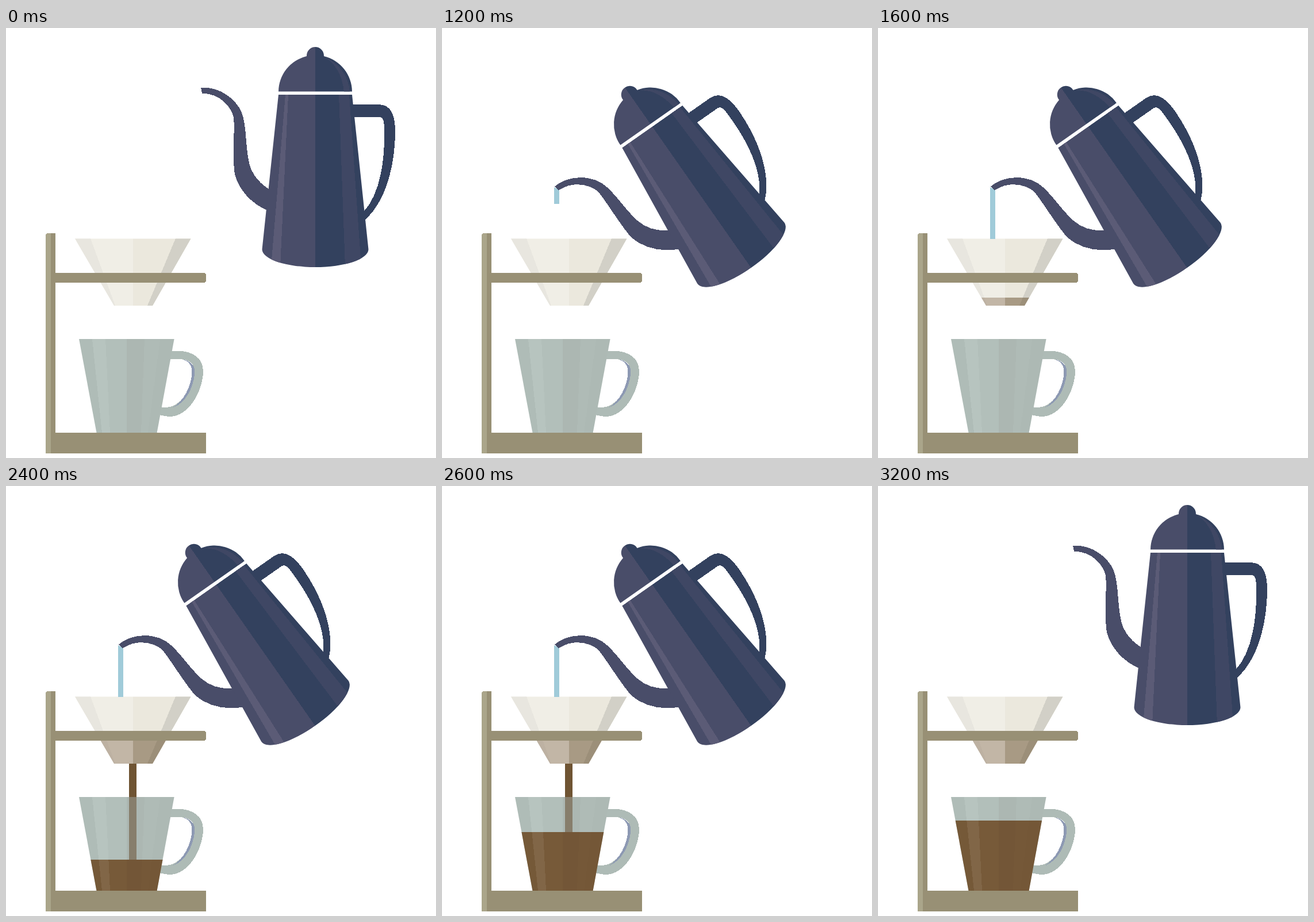
Recreate the animation shown at these times as an HTML page. Size 748x748 px, loop 4.7 s.

```html
<!DOCTYPE html>
<html lang="en">
<head>
<meta charset="utf-8">
<title>Pour-over coffee</title>
<style>
  html, body { margin: 0; height: 100%; overflow: hidden; background: #fff; }
  svg { display: block; width: 100%; height: 100%; }
</style>
</head>
<body>
<svg viewBox="0 0 748 748" shape-rendering="crispEdges">
  <defs>
    <clipPath id="cupShape"><path d="M127 541H292.600L262.600 704H157.500Z"/></clipPath>
    <clipPath id="coneShape"><path d="M120 366.500H321.500L255 483H188Z"/></clipPath>
    <clipPath id="bodyShape"><path d="M474 116H602L630.500 385A92.500 31 0 0 1 445.500 385Z"/></clipPath>
    <clipPath id="lidShape"><path d="M474 110.500A64 64 0 0 1 523 49V48A15 15 0 0 1 553 48V49A64 64 0 0 1 602 110.500Z"/></clipPath>
  </defs>

  <g id="cone" clip-path="url(#coneShape)">
    <path fill="#f0eee6" d="M120 366H221V484H120Z"/>
    <path fill="#ebe8dd" d="M221 366H322V484H221Z"/>
    <path fill="#e8e6df" d="M120 366H147L190 483H180Z"/>
    <path fill="#d2d0c7" d="M295 366H322V483H246Z"/>
    <g fill="#6f5535">
      <rect id="brewLeft" x="120" width="101" opacity=".36"/>
      <rect id="brewRight" x="221" width="101" opacity=".53"/>
    </g>
  </g>

  <path fill="#989075" d="M78 357H86V426H343Q348.400 426 348.400 432V437Q348.400 443 343 443H86V703.600H348.400V740.400H78Z"/>
  <path fill="#aaa58a" d="M71 357H78V740.400H69V359Z"/>

  <path fill="#aebbb6" fill-rule="evenodd" d="M286 562C321 559 343 571 343 598C342 632 318 677 283 676L266 673L268 659C300 667 321 632 328.500 600C329 584 319 576 300 576H285Z"/>
  <path fill="#8d99b3" d="M308 576.500Q329 581 328.500 600C325 630 311 653 290 660.500C309 649 322 624 323.500 600Q324 582 308 576.500Z"/>
  <g clip-path="url(#cupShape)">
    <rect fill="#b2bfba" x="127" y="541" width="167" height="163"/>
    <rect id="innerDrip" fill="#6f5433" opacity=".55" x="214" y="541" width="13"/>
    <rect id="coffee" fill="#775a39" x="127" width="167"/>
    <path opacity=".07" fill="#fff" d="M150 541H173L181 704H167Z"/>
    <path opacity=".02" d="M210 541H294V704H210Z"/>
    <path opacity=".02" d="M210 541H241L235 704H210Z"/>
    <path opacity=".01" d="M268 541H294V704H247Z"/>
    <path opacity=".015" d="M127 541H150L167 704H127Z"/>
  </g>
  <rect id="drip" fill="#6f5433" x="214" y="483" width="13"/>
  <path id="water" fill="#a0cbd9"/>

  <g id="pot">
    <path fill="#33415e" d="M600 133H648C670 133 677 152 677 180C677 240 660 303 624 334L620 322C648 294 658 240 658 190C658 168 659 155 649 155H600Z"/>
    <path fill="#494d69" d="M339 104C368 101 399 121 410 147C419 172 416 203 423 235C428 256 441 270 460 282L456 318C425 305 405 280 398 255C394 235 398 170 396 155C392 139 374 114 341 113.500Z"/>
    <g clip-path="url(#bodyShape)">
      <path fill="#494d69" d="M440 116H538V416H440Z"/>
      <path fill="#5b5b76" d="M486 116H491L477 416H461Z"/>
      <path fill="#33415e" d="M538 116H632V416H538Z"/>
      <path fill="#3f4764" d="M579 116H597L618 416H590Z"/>
    </g>
    <g clip-path="url(#lidShape)">
      <path fill="#494d69" d="M470 32H538V111H470Z"/>
      <path fill="#33415e" d="M538 32H604V111H538Z"/>
      <path fill="#3f4764" d="M552 49Q583 66 588 111H598Q594 68 552 49Z"/>
    </g>
  </g>
</svg>
<script>
  const LOOP = 4700;
  const CONE_BOTTOM = 483, CUP_TOP = 541, CUP_BOTTOM = 704;
  const el = id => document.getElementById(id);

  // Each track lists [start time, value]; values hold until the next start.
  const tracks = {
    tilt: [[0, 0], [1000, 1], [1200, 2], [3000, 1], [3200, 0]],
    water: [[0, 0], [1200, 306], [1400, 367], [3000, 0]],
    brew: [[0, CONE_BOTTOM], [1600, 469], [1800, 446], [2000, 443]],
    drip: [[0, CONE_BOTTOM], [2000, 517], [2200, CUP_BOTTOM], [3200, CONE_BOTTOM]],
    coffee: [[0, CUP_BOTTOM], [2200, 687], [2400, 650], [2600, 602], [3000, 582]]
  };
  const poses = [
    "",
    "translate(-91 14) rotate(-17.5 538 113)",
    "translate(-174 56) rotate(-35 538 113)"
  ];

  const valueAt = (track, t) => track.findLast(([start]) => start <= t)[1];

  function span(id, top, bottom) {
    el(id).setAttribute("y", top);
    el(id).setAttribute("height", Math.max(0, bottom - top));
  }

  function draw(now) {
    const t = now % LOOP;
    const at = name => valueAt(tracks[name], t);
    const water = at("water"), drip = at("drip"), level = at("coffee");

    el("pot").setAttribute("transform", poses[at("tilt")]);
    el("water").setAttribute("d", water ? `M195 277L204 281V${water}H195Z` : "");
    span("brewLeft", at("brew"), CONE_BOTTOM);
    span("brewRight", at("brew"), CONE_BOTTOM);
    span("drip", CONE_BOTTOM, Math.min(drip, CUP_TOP));
    span("innerDrip", CUP_TOP, Math.min(drip, level));
    span("coffee", level, CUP_BOTTOM);
    requestAnimationFrame(draw);
  }
  draw(0);
</script>
</body>
</html>
```
